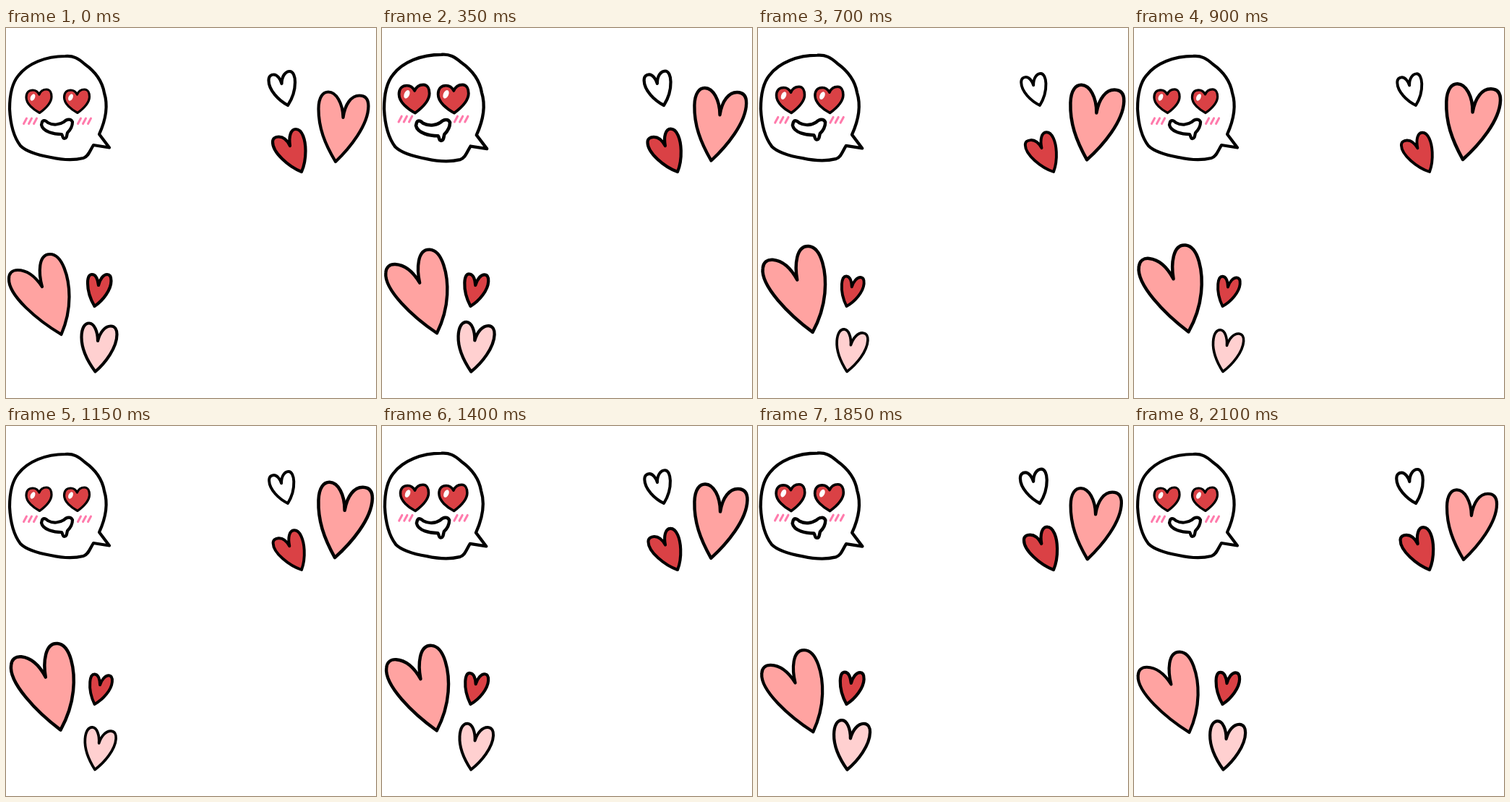
Animation of 512x512 px, one loop 2300 ms. Source, as an HTML page:

```html
<!DOCTYPE html>
<html>
<head>
<meta charset="utf-8">
<style>
  html, body { margin: 0; width: 100%; height: 100%; overflow: hidden; background: #fff; }
  svg { display: block; width: 100%; height: 100%; }
</style>
</head>
<body>
<svg viewBox="0 0 512 512" fill="#fff" stroke="#000" stroke-width="4.200" stroke-linejoin="round" stroke-linecap="round">
  <defs>
    <g id="eye" stroke-width="3.200">
      <path fill="#da4145" d="M46.500 117.500C38 113 28 105 28 96C28 89 32 86 37 86C41 86 44 88 46 92C48 87 52 85 56 85C61 85 63 90 63 95C63 104 54 112 46.500 117.500Z"/>
      <ellipse cx="37" cy="96" rx="3" ry="5" transform="rotate(25 37 96)" stroke="none"/>
    </g>
    <path id="cheek" d="M24.500 132.500l4-7.500m3 7.500l4-7.500m3 7.500l4-7.500" fill="none" stroke="#ff7bac" stroke-width="3"/>
  </defs>
  <g id="face">
    <path d="M129 147L143 165.500L121 162C116 170 114 178 107 180C95 183 80 183 62 179C45 176 29 172 20 163C10 150 6 132 5 112C5 95 7 78 17 66C30 49 55 39 82 39C93 38 100 42 109 50C123 60 133 72 136 90C141 106 139 125 129 147Z"/>
    <g id="cheeks"><use href="#cheek"/><use href="#cheek" x="75"/></g>
    <path id="mouth" d="M50 130C52 126 56 129 58 131C65 135 74 134 80 130C84 126 90 125 92 130C92 136 89 141 85 145C84 149 84 153 81 153C78 153 79 150 77 147C67 147 51 144 49 134Z"/>
    <g id="eyeL"><use href="#eye"/></g>
    <g id="eyeR"><use href="#eye" x="52.500"/></g>
  </g>
  <g id="hearts"></g>
</svg>
<script>
const $ = id => document.getElementById(id);
const STEP = 50, LOOP = 2300, LAST = 2100;

// tip, drift of the tip, turn in degrees, growth, squash
const hearts = [
  { fill: '#ffa3a1', tip: [456, 185], drift: [-1, -3], turn: 2, grow: .08, squash: 0,
    d: 'M456 185C441 160 432.5 138 432.5 112C432.5 95 439 88.5 446 88.5C457 88.5 466 104 466.5 124C469 105 478 93.5 489 93.5C498 93.5 501.5 99 501.5 108C501.5 134 476 166 456 185Z' },
  { fill: '#ffa3a1', tip: [76.5, 424], drift: [-1, -3.5], turn: 6, grow: .07, squash: 0,
    d: 'M76.5 424C43 404 3 370 4 347C4 339 9 335 16 335C30 335 42 346 50 358C45 340 44 313 61 313C78 313 87.5 345 87.5 372C87.5 392 82.5 410 76.5 424Z' },
  { fill: '#ffd0d0', tip: [123.5, 475.5], drift: [-.5, 0], turn: 4, grow: 0, squash: .13,
    d: 'M123.5 475.5C112 460 104.5 445 104.500 428C104.5 415 109 408.500 115 408.5C122 408.5 127 420 127 433C130 421 137 412.5 145 412.5C151 412.5 153.5 418 153.5 424C153.5 442 138 463 123.5 475.5Z' },
  { fill: '#fff', tip: [390, 107], drift: [0, 0], turn: -2, grow: 0, squash: .065,
    d: 'M390 107C377 100 363.5 86 363.5 72.5C363.5 66.5 367 64.5 370.5 64.5C375.5 64.5 380 71 381.5 77C381.5 67 386.500 60 392.5 60C397.5 60 400 67 400 75C400 88 396 98 390 107Z' },
  { fill: '#da4145', tip: [409, 199], drift: [0, 0], turn: -3, grow: 0, squash: .065,
    d: 'M409 199C391 192 368.5 172 369 157.5C369 152.5 373 150.5 377.5 150.5C385 150.5 390 157 393 163C391 150 394 140 401 140C410 140 414.5 155 414.5 170C414.5 182 413 190 409 199Z' },
  { fill: '#da4145', tip: [122.5, 385], drift: [0, 0], turn: 5, grow: 0, squash: .06,
    d: 'M122.5 385C116 374 113 364 113 353C113 345 115 341 119 341C124 341 127 348 128 356C130 347 135 341 140 341C144.500 341 145.5 345 145.5 350C145.5 362 134.5 377 122.5 385Z' }
];

for (const h of hearts) {
  h.el = document.createElementNS('http://www.w3.org/2000/svg', 'path');
  h.el.setAttribute('d', h.d);
  h.el.setAttribute('fill', h.fill);
  $('hearts').append(h.el);
}

const times = [0, 350, 700, 950, 1150, 1400, 1650, 2100];
const growth = [0, .5, .88, 1.03, .97, .73, .41, 0];
const turning = [0, .5, .9, 1, 1, .75, .42, .2];
const squash = [0, .15, -1, -1.1, -1, -.4, .15, 0];

// smooth curve through the keys
function curve(keys, t) {
  let i = 0;
  while (i < times.length - 2 && t >= times[i + 1]) i++;
  const slope = j => {
    const a = Math.max(j - 1, 0), b = Math.min(j + 1, times.length - 1);
    return (keys[b] - keys[a]) / (times[b] - times[a]);
  };
  const w = times[i + 1] - times[i], u = (t - times[i]) / w, v = 1 - u;
  return keys[i] * v * v * (1 + 2 * u) + keys[i + 1] * u * u * (3 - 2 * u)
    + w * u * v * (slope(i) * v - slope(i + 1) * u);
}

// two beats, mirrored around the middle of the loop
function beat(t) {
  const u = Math.min(t, LAST - t);
  const x = u < 450 ? u / 450 : Math.max(0, (950 - u) / 500);
  return (1 - Math.cos(Math.PI * x)) / 2;
}

const set = (el, value) => el.setAttribute('transform', value);
const scaleAt = (x, y, s) => `translate(${x} ${y}) scale(${s}) translate(${-x} ${-y})`;

function draw(now) {
  const t = Math.min(Math.floor(now % LOOP / STEP) * STEP, LAST);
  const b = beat(t);
  set($('face'), scaleAt(72, 112, 1 + .035 * b));
  set($('eyeL'), scaleAt(46, 118, 1 + .19 * b));
  set($('eyeR'), scaleAt(98.5, 118, 1 + .19 * b));
  set($('mouth'), scaleAt(70, 128, 1 + .07 * b));
  set($('cheeks'), `translate(0 ${-3.5 * b})`);

  const g = curve(growth, t), r = curve(turning, t), q = curve(squash, t);
  for (const h of hearts) {
    const [x, y] = h.tip, [dx, dy] = h.drift;
    set(h.el, `translate(${dx * g} ${dy * g}) rotate(${h.turn * r} ${x} ${y}) `
      + scaleAt(x, y, 1 + h.grow * g + h.squash * q));
  }
}

let start;
function tick(now) {
  start ??= now;
  draw(now - start);
  requestAnimationFrame(tick);
}
draw(0);
requestAnimationFrame(tick);
</script>
</body>
</html>
```
